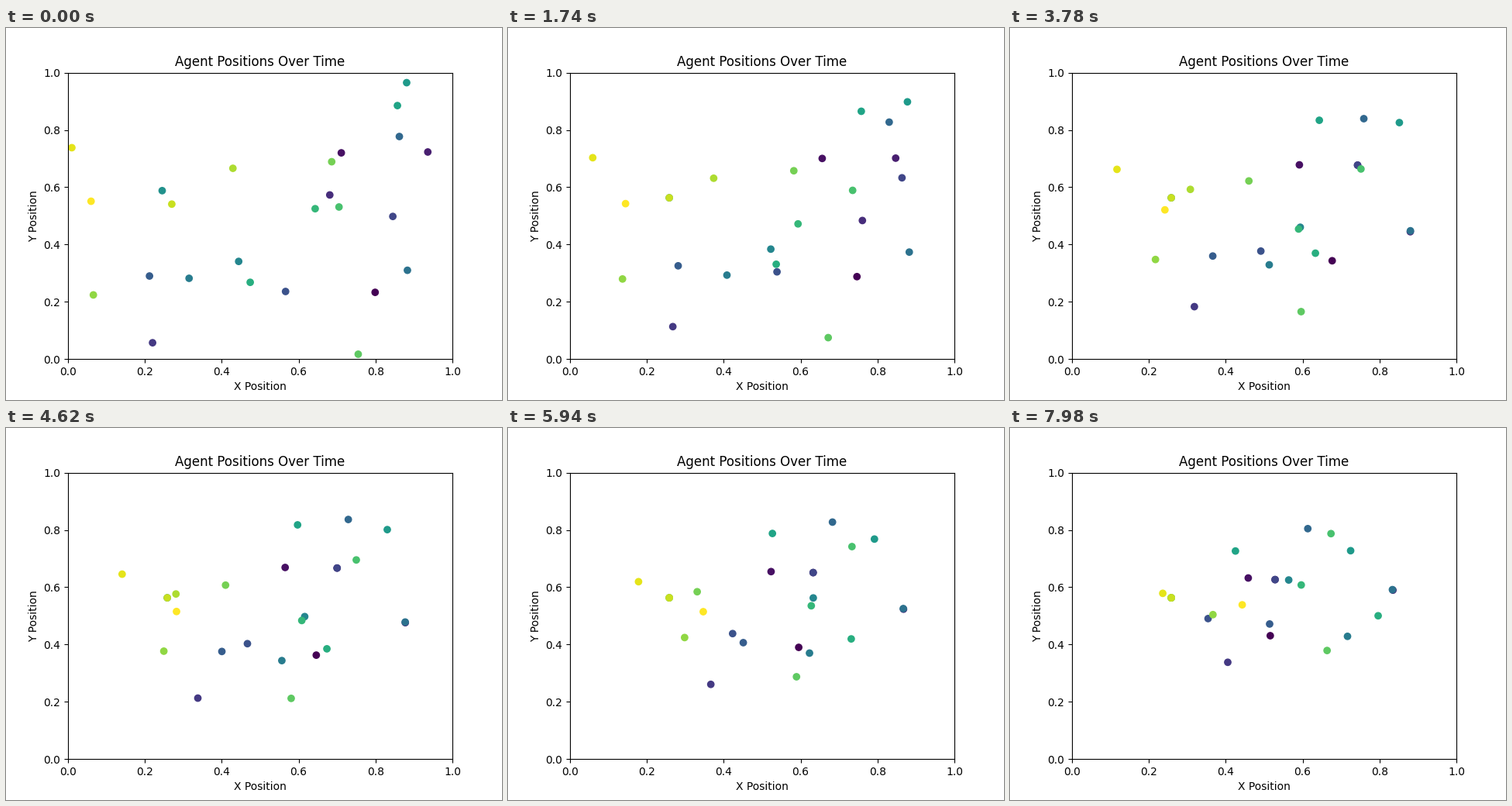
These frames come from a looping animation (640 px wide and 480 px high, 8000 ms). A matplotlib script:

```python
import math

import matplotlib.pyplot as plt
from matplotlib.animation import FuncAnimation

TICK = 20            # ms per drawn frame
HOLD = 3             # drawn frames per simulation step
FRAMES = 400
HUB = 22             # the agent chased when no other is named


class Agent:
    """Starts at a point and walks at a steady pace (1e-5 per step) after its prey."""

    def __init__(self, x, y, pace, prey=HUB):
        self.x, self.y = x, y
        self.step = pace * 1e-5
        self.prey = prey

    def chase(self, other):
        dx, dy = other.x - self.x, other.y - self.y
        dist = math.hypot(dx, dy)
        share = min(1, self.step / dist) if dist else 0
        self.x += dx * share
        self.y += dy * share


def make_agents():
    return [
        Agent(.799, .233, 262, 21), Agent(.711, .720, 201),
        Agent(.936, .723, 315), Agent(.681, .573, 413, 9),
        Agent(.220, .057, 254, 8), Agent(.845, .498, 477, 2),
        Agent(.566, .236, 255, 21), Agent(.212, .290, 269, 16),
        Agent(.862, .777, 215, 14), Agent(.883, .310, 219, 13),
        Agent(.315, .282, 326, 15), Agent(.444, .341, 309, 5),
        Agent(.245, .588, 270), Agent(.881, .965, 231, 5),
        Agent(.857, .885, 349, 23), Agent(.474, .268, 308, 3),
        Agent(.643, .525, 251, 11), Agent(.705, .531, 226, 8),
        Agent(.755, .017, 350, 10), Agent(.686, .689, 374),
        Agent(.066, .224, 310, 1), Agent(.429, .666, 225),
        Agent(.270, .541, 250, 12), Agent(.010, .738, 208),
        Agent(.060, .551, 293, 16),
    ]


def simulate(steps):
    agents = make_agents()
    track = []
    for _ in range(steps):
        track.append([(a.x, a.y) for a in agents])
        for a in agents:
            a.chase(agents[a.prey])
    return track


track = simulate(FRAMES // HOLD + 1)

fig, ax = plt.subplots(figsize=(6.4, 4.8), dpi=100)
dots = ax.scatter(*zip(*track[0]), c=range(len(track[0])), cmap="viridis")
ax.set(xlim=(0, 1), ylim=(0, 1), xlabel="X Position", ylabel="Y Position",
       title="Agent Positions Over Time")


def update(frame):
    dots.set_offsets(track[frame // HOLD])
    return (dots,)


anim = FuncAnimation(fig, update, frames=FRAMES, interval=TICK,
                     repeat=True, repeat_delay=0)
plt.show()
```
